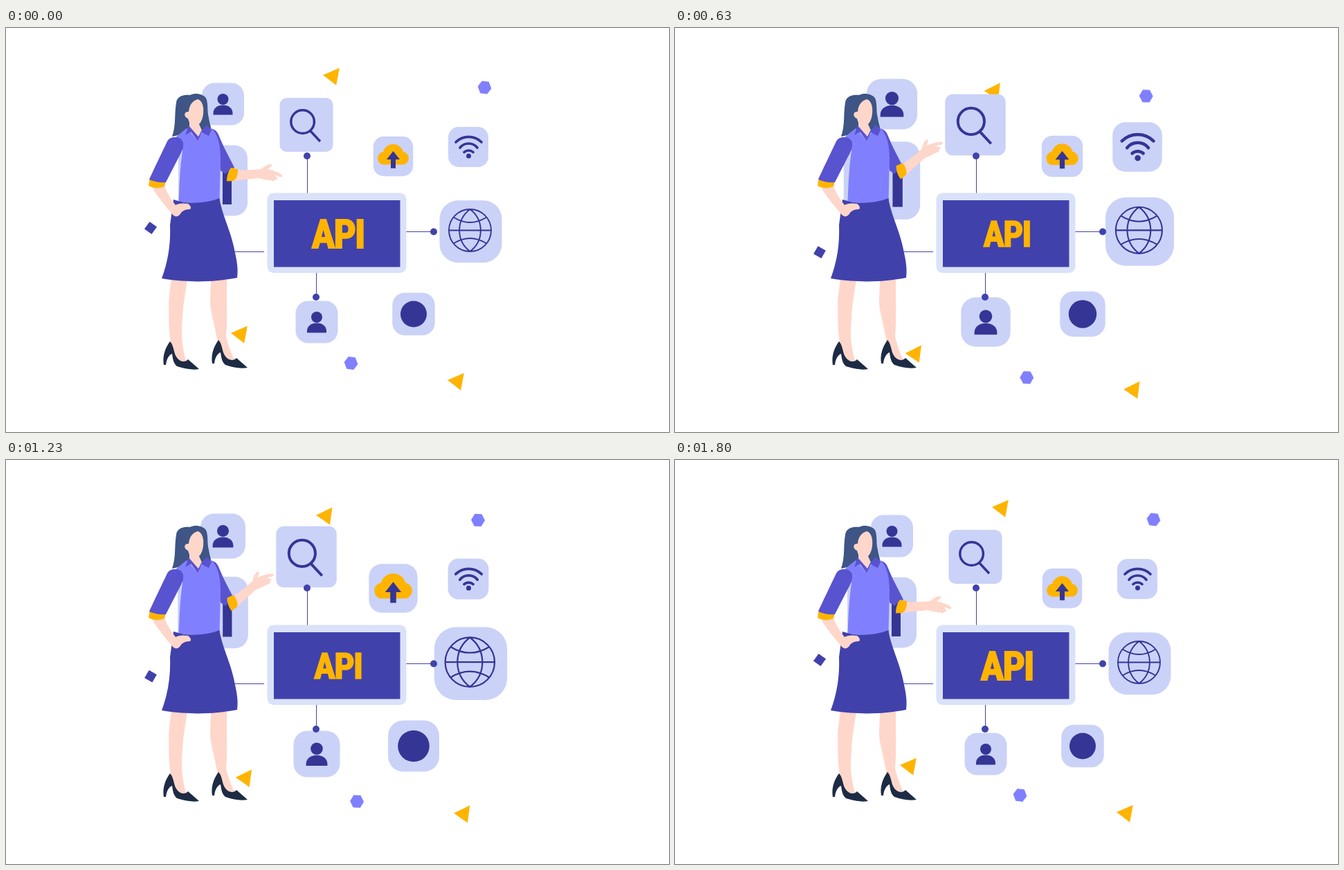
An HTML page that plays this animation: 958x584 px, repeating every 1.83 s.

```html
<!DOCTYPE html>
<html lang="en">
<head>
<meta charset="utf-8">
<title>API</title>
<style>
html, body { margin: 0; width: 100%; height: 100%; overflow: hidden; background: #fff; }
svg { display: block; width: 958px; height: 584px; }
.ink { fill: #353595; }
.line { fill: none; stroke: #353595; }
.indigo { fill: #4141ab; }
.wire { stroke: #4141ab; shape-rendering: crispEdges; }
.gold { fill: #ffb400; }
.violet { fill: #8080ff; }
.sleeve { fill: #5853cf; }
.skin { fill: #ffd6ca; }
.hair { fill: #3e5585; }
.shoe { fill: #1d2b45; }
text { font: 900 57px Impact, Anton, "Roboto Condensed", "Open Sans Condensed", Roboto, sans-serif;
  font-stretch: condensed; letter-spacing: -2px; text-anchor: middle;
  stroke: #ffb400; stroke-width: 1.8px; }
</style>
</head>
<body>
<svg viewBox="0 0 958 584">
  <defs>
    <path id="shoe" d="M237 453C229 464 226 476 228 487L231 487C232 478 236 472 240 471C241 478 242 485 247 489C256 492 268 495 279 493L263 479C258 485 248 482 244 471C242 464 241 457 237 453Z"/>
  </defs>
  <g id="bits"></g>
  <g id="tiles"></g>

  <path class="wire" d="M435.500 185V240M578 294.500H618M448.500 354V389M325 323.500H373"/>
  <g class="indigo">
    <circle cx="435" cy="185" r="5"/>
    <circle cx="618" cy="294.5" r="5"/>
    <circle cx="448" cy="389" r="5"/>
  </g>
  <rect x="377.5" y="238.5" width="201" height="115.5" rx="9" fill="#dae2f9"/>
  <rect class="indigo" x="387" y="249" width="182.5" height="96.5"/>
  <g id="label"><text class="gold" x="-.5" y="20.7">API</text></g>

  <g id="woman">
    <path class="skin" d="M239 362L262 364C258 390 256 400 255 420C253 445 254 458 260 481L250 484L243 472L238 455C234 430 236 410 235 395Z"/>
    <path class="skin" d="M296 364L319 364C319 400 320 430 318 446C321 458 325 470 330 479L319 482L312 471L306 455C302 430 295 410 295 395Z"/>
    <use class="shoe" href="#shoe"/>
    <use class="shoe" href="#shoe" x="70" y="-2"/>
    <path class="hair" d="M240 157C246 140 243 125 246 108C247 98 258 96 266 97C274 93 284 96 288 100C293 106 290 120 293 130C294 138 297 143 296 148L262 152Z"/>
    <path class="sleeve" d="M295 145C301 146 305 149 307 154C314 172 323 187 330 202C325 204 320 207 317 211L310 206L306 175Z"/>
    <g id="arm">
      <path class="skin" d="M328 205C345 206 358 205 369 204C372 201 376 198 381 197C385 197 385 199 382 201L378 204C386 206 394 208 399 213C400 215 398 216 395 215L388 212L392 217C393 219 391 220 389 219C388 222 385 222 382 220C376 220 370 218 365 217L328 221Z"/>
      <path class="gold" d="M325 202L335 204C335 212 333 218 329 221L319 221.500C319 214 321 207 325 202Z"/>
    </g>
    <path class="violet" d="M246 157L261 145L276 161L290 143L299 147C307 156 310 172 310 190L308.500 249C290 255 265 254 249.500 250C250.500 228 251 205 255 178Z"/>
    <path class="skin" d="M277 103C268 106 265 112 264 121C257 120 256 128 263 131L265 137V148L276 162L283 148L279 139C284 134 286 124 285 115C284 108 281 104 277 103Z"/>
    <path class="sleeve" d="M264 141L259 155L267 150L277 163L283 151L293 156L297 147L290 140L282 149L278 157Z"/>
    <path class="indigo" d="M242 248C262 255 288 254 308.500 246C311 268 326 295 331 325C335 343 335 350 334 361C300 368 258 368 225 362C235 335 238 310 237 285Z"/>
    <path class="skin" d="M210 229L229 228C233 240 239 248 245 256C250 253 257 253 263 254C267 257 268 260 266 262C261 262 257 263 253 267C250 273 245 274 241 270C231 258 219 244 210 229Z"/>
    <path class="gold" d="M208 215L232 218L229 229C222 232 213 232 206 228Z"/>
    <path class="sleeve" d="M238 159C246 156 254 158 256 166C257 172 254 179 250 186L231 223C222 224 214 222 207 219C214 203 224 183 231 168C233 163 235 160 238 159Z"/>
  </g>
</svg>
<script>
const $ = id => document.getElementById(id);
const person = '<g class="ink"><circle cy="-7" r="8"/><path d="M-14 15.500V13C-14 6 -8 1.500 0 1.500S14 6 14 13V15.500Z"/></g>';
const magnifier = '<g class="line" stroke-width="3.500"><circle cx="-5.400" cy="-4.500" r="16.800"/><path d="M6 9L20 24"/></g>';
const cloud = '<path class="gold" d="M-15.500 12A9.500 9.500 0 0 1 -14.500 -6.500A15 15 0 0 1 14.500 -6.500A9.500 9.500 0 0 1 15.500 12Z"/><path class="ink" d="M0 -7.500L9.500 4.500H3.500V17.200H-3.500V4.500H-9.500Z"/>';
const wifi = '<path class="line" stroke-width="3.700" stroke-linecap="round" d="M-18 -7A26.500 26.500 0 0 1 19 -7M-12 1A16 16 0 0 1 13 1M-6 7.500A9.700 9.700 0 0 1 7 7.500"/><circle class="ink" cx=".5" cy="13" r="3.500"/>';
const globe = '<path class="line" stroke-width="1.900" transform="translate(-1 -1.700)" d="M-30.500 0A30.500 30.500 0 1 1 30.500 0A30.500 30.500 0 1 1 -30.500 0H30.500M0 -30.500C-20.500 -15 -20.500 15 0 30.500C20.500 15 20.500 -15 0 -30.500M-24 -19Q0 -4 24 -19M-24 19Q0 4 24 19"/>';
const bar = '<rect class="ink" x="14" y="-22" width="13" height="56.500"/>';
const disc = '<circle class="ink" r="19"/>';

// x, y, width, height, corner, icon, time of peak, growth
const tiles = [
  [313.5, 110, 61, 61, 18, person, 800, .235],
  [299, 220.5, 100, 102, 19, bar, 733, .11],
  [434, 140, 77, 78, 10, magnifier, 933, .235],
  [559.5, 185.5, 57.5, 57.5, 15, cloud, 1133, .235],
  [668, 172, 58, 58, 15, wifi, 667, .235],
  [671.5, 294.2, 90, 90, 27, globe, 1000, .235],
  [449, 425, 61, 61, 18, person, 867, .235],
  [589, 413.5, 61.5, 61.5, 18, disc, 1067, .235]
];

const triangle = '<path class="gold" d="M-14 -2L9.800 -12.200L5.200 12.800Z"/>';
const hexagon = '<path class="violet" d="M10 0L5 9H-5L-10 0L-5 -9H5Z" transform="rotate(8)"/>';
const square = '<rect class="indigo" x="-6.500" y="-6.500" width="13" height="13" transform="rotate(36)"/>';

// x, y, shape, sideways travel, fall, lift on the way back, turn
const bits = [
  [472, 70, triangle, -14, 27.5, 3.7, -4],
  [339, 443, triangle, 9.8, 35.5, 2, -4],
  [652, 511, triangle, 13, 15.5, 7.5, -4],
  [691.5, 86, hexagon, -13.5, 15.5, 7.5, -8],
  [498.5, 484.5, hexagon, 12.3, 26, 5, -8],
  [209, 289, square, 0, 44, 0, -8]
];

function build(parent, markup) {
  parent.insertAdjacentHTML('beforeend', `<g>${markup}</g>`);
  return parent.lastElementChild;
}
const tileNodes = tiles.map(([, , w, h, r, icon]) => build($('tiles'),
  `<rect x="${-w / 2}" y="${-h / 2}" width="${w}" height="${h}" rx="${r}" fill="#cad2f8"/>${icon}`));
const bitNodes = bits.map(b => build($('bits'), b[2]));

const move = (node, value) => node.setAttribute('transform', value);

// Cosine swell that peaks at `mid` and is zero beyond `half` either side
const bell = (t, mid, half) =>
  Math.abs(t - mid) < half ? (1 + Math.cos(Math.PI * (t - mid) / half)) / 2 : 0;

function draw(t) {
  const sway = bell(t, 900, 900);
  const fall = bell(t, 900, t < 900 ? 900 : 700);
  const lift = bell(t, 1200, 500);
  const raise = t < 667 ? bell(t, 667, 667) : t < 1333 ? 1 : bell(t, 1333, 467);

  tiles.forEach(([x, y, , , , , peak, grow], i) =>
    move(tileNodes[i], `translate(${x} ${y}) scale(${1 + grow * bell(t, peak, 667)})`));
  bits.forEach(([x, y, , dx, dy, up, turn], i) =>
    move(bitNodes[i], `translate(${x + dx * sway} ${y + dy * fall - up * lift}) rotate(${turn * sway})`));
  move($('label'), `translate(480 297.5) scale(${1 - .128 * sway})`);
  move($('arm'), `rotate(${-36 * raise} 318 209)`);
}

// Thirty steps a second, starting at 0, 30 and 70 of each 100 ms
function tick(now) {
  const t = (now - start) % 1830, rest = t % 100;
  const step = Math.floor(t / 100) * 3 + (rest >= 30) + (rest >= 70);
  draw(step * 100 / 3);
  requestAnimationFrame(tick);
}
const start = performance.now();
draw(0);
requestAnimationFrame(now => tick(Math.max(now, start)));
</script>
</body>
</html>
```
